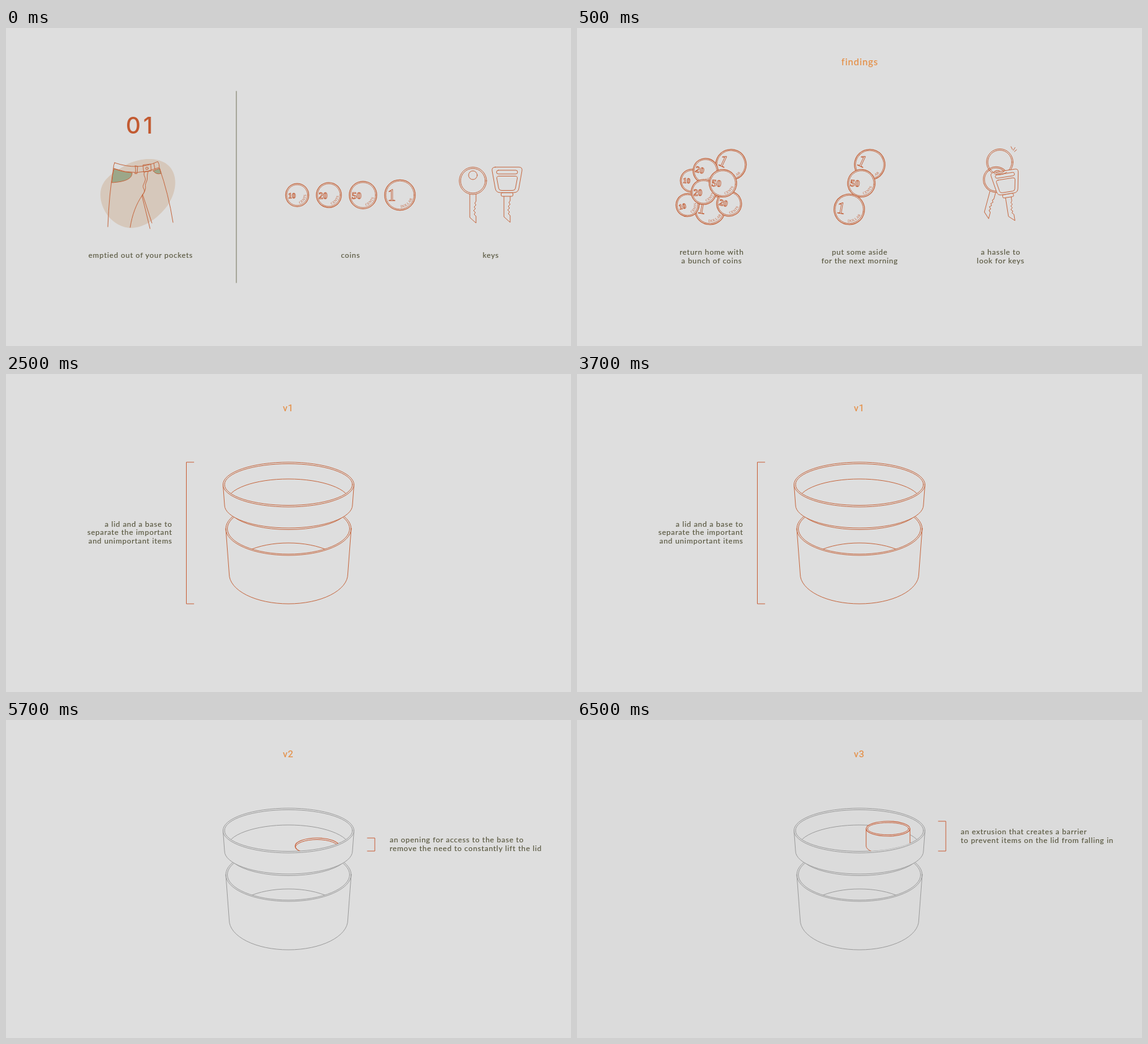
An HTML page for the animation above (8000 ms loop, 910x512 px).

```html
<!DOCTYPE html>
<html lang="en">
<head>
<meta charset="utf-8">
<style>
html, body { margin: 0; height: 100%; overflow: hidden; background: #dedede; }
svg { display: block; width: 100vw; height: 100vh; --bg: #dedede; --ink: #c4623b; --line: #c5673f; }
svg > g { display: none; }
svg > g.on { display: inline; }
path, circle, ellipse, rect { fill: none; stroke: var(--line); stroke-linecap: round; stroke-linejoin: round; }
.solid { fill: var(--bg); }
.hot { --line: #c85f38; }
.muted { --line: #9b9b9b; }
text { font: 12px Lato, sans-serif; letter-spacing: .75px; fill: #58573f; stroke: #58573f; stroke-width: .15; white-space: pre; }
.title { font: 15px Lato, sans-serif; letter-spacing: .95px; fill: #e58d42; stroke: #e58d42; }
.version { font: 15px Roboto, sans-serif; letter-spacing: .8px; }
.number { font: 500 37px Inter, sans-serif; letter-spacing: 4px; fill: #c25a31; stroke: none; }
.value { font: bold 15px "Liberation Serif", serif; letter-spacing: 0; fill: none; stroke: var(--ink); stroke-width: .9; }
.unit { font: 5.8px "Liberation Serif", serif; letter-spacing: .3px; fill: var(--ink); stroke: none; }
</style>
</head>
<body>
<svg id="stage" viewBox="0 0 910 512" preserveAspectRatio="none"></svg>
<script>
const path = (d, attrs = '') => `<path d="${d}" ${attrs}/>`;
const ellipse = (cx, cy, rx, ry, attrs = '') =>
  `<ellipse cx="${cx}" cy="${cy}" rx="${rx}" ry="${ry}" ${attrs}/>`;
const place = (x, y, angle, scale, body) =>
  `<g transform="translate(${x} ${y}) rotate(${angle}) scale(${scale})">${body}</g>`;

// Lines of text; the shift cancels the letter spacing after the last glyph.
const shift = { start: 0, middle: .4, end: .75 };
const label = (x, y, anchor, ...lines) => lines.map((line, i) =>
  `<text x="${x + shift[anchor]}" y="${y + i * 13.7}" text-anchor="${anchor}">${line}</text>`).join('');
const version = n => `<text class="title version" x="446" y="60">v${n}</text>`;

// Value: radius, font size, left edge, baseline
const coins = {
  10: [19, 12, -14.5, 4.5],
  20: [20.5, 14, -16.3, 5.5],
  50: [22.5, 15.5, -18, 6],
  1: [25, 27, -20, 9]
};
const arcs = Object.entries(coins).map(([value, [r]]) => {
  const a = r - 4.5;
  return path(`M0 ${a}A${a} ${a} 0 0 0 ${a} 0`, `id="arc${value}"`);
}).join('');

function coin(value, x, y, angle = 0) {
  const [r, size, left, base] = coins[value];
  const dollar = value === 1;
  const weight = dollar ? 'normal' : 'bold';
  return place(x, y, angle, 1,
    ellipse(0, 0, r - .4, r - .4, 'class="solid" stroke-width="1.3"') +
    ellipse(0, 0, r - 2.3, r - 2.3, 'stroke-width=".9"') +
    `<text class="value" x="${left}" y="${base}" style="font-size:${size}px;font-weight:${weight}">${value}</text>` +
    `<text class="unit"><textPath href="#arc${value}" startOffset="${dollar ? 4 : 16}%">${dollar ? 'DOLLAR' : 'CENTS'}</textPath></text>`);
}

// Keys are centred on their heads.
const blade = (x, top) => path(
  `M${x} ${top}V59L${x + 10} 68V57l-3-3 2-3-3-3 3-3-2-3 3-3-2-3 2-3V${top}`, 'class="solid"');
const roundKey = blade(-5, 21) + ellipse(0, 0, 22, 22, 'class="solid"') +
  ellipse(0, 0, 19.8, 19.8) + ellipse(0, -9, 7, 7);
const squareKey = blade(-5, 26) +
  '<rect class="solid" x="-9.5" y="20" width="19" height="6" rx="2"/>' +
  path('M-19-21H19Q25-21 24-15L19 13Q18 20 11 20H-11Q-18 20-19 13L-24-15Q-25-21-19-21Z', 'class="solid"') +
  '<rect x="-17" y="-16" width="34" height="6" rx="3"/>' +
  path('M-13-6.5H13Q17-6.5 16.5-3L13.5 13Q13 16.5 9 16.5H-9Q-13 16.5-13.5 13L-16.5-3Q-17-6.5-13-6.5Z');

const trousers =
  path('M152 268C152 243 176 230 198 218C220 208 251 207 265 225C278 242 273 267 260 286C246 305 224 322 201 322C173 321 152 294 152 268Z',
    'style="fill:#d6c8bb;stroke:none"') +
  path('M174 226.5Q187 232 203 233Q204 247 170.5 249Q171 236 174 226.5ZM237 230L247.5 226L250 234Q242 237 237 230Z', 'style="fill:#9ca789"') +
  path(`M175 217Q173 221 173 226Q210 240 247 224.5Q247 219 244.5 215Q213 230 175 217Z
    M173 226Q166 267 164 320M247 225Q262 268 269 313
    M200 321C203 301 210 283 219 270L232 323M220 268L235 314
    M208 222l4 .5-1 12-3.5 0c2-4 1-8 .5-12.5M221 220.5l12-1.5 1 11-12 2ZM238 218l2 10
    M223 232c-3 6 3 8 1 14s-5 8-2 13-2 8-3 11M229 231c-3 8 0 11-3 17s0 8-2 13-2 5-5 9`) +
  ellipse(227, 226, 2, 2);

const ring = ellipse(681, 216, 21.4, 21.4) + ellipse(681, 216, 19.3, 19.3);
const keyring = place(675, 244, 15, .94, roundKey) + ring +
  place(691, 249, -9, .92, squareKey) +
  path('M672 234.5Q681 239 692 232.500M675 233Q681 236 688 231') +
  path('M699 191l2.3 4.5M705.5 192.5l-2.8 4.5M708 196l-3.5 3');

const rim = [455, 178, 103, 33.5];
const jar = extra =>
  ellipse(455, 249, 101, 43) + ellipse(455, 249, 98.5, 41) +
  ellipse(455, 315, 92, 43, 'clip-path="url(#baseRim)"') +
  path('M354 249L359.5 322A95.5 48 0 0 0 550.5 322L556 249') +
  path('M367 230A96 34.2 0 0 0 543 230', 'class="solid"') +
  path('M349.5 178L352 211A103 37 0 0 0 558 211L560.5 178', 'class="solid"') +
  ellipse(455, 178, 105.5, 36, 'class="solid"') + ellipse(...rim) +
  `<g clip-path="url(#lidRim)">${ellipse(455, 205, 99, 36)}${extra}</g>`;

const opening = `<g class="hot">${ellipse(501, 203, 35.3, 13, 'stroke-width="1.2"')}
  <g clip-path="url(#hole)">${ellipse(501, 205.5, 35, 13)}</g></g>`;
const tube = `<g class="hot">${path('M465.7 175V203A35.3 13 0 0 0 536.3 203V175', 'class="solid"')}
  ${ellipse(501, 175, 35.3, 12, 'class="solid" stroke-width="1.2"')}${ellipse(501, 175, 33, 9.8)}</g>`;
const bracket = (x, y1, x2, y2) => path(`M${x} ${y1}H${x2}V${y2}H${x}`, 'class="hot"');

const scenes = [
  [500, path('M371 102V410', 'style="stroke:#8b8b79;stroke-width:1.3"') +
    '<text class="number" x="193" y="170">01</text>' + trousers +
    coin(10, 469, 269) + coin(20, 520, 269) + coin(50, 575, 269) + coin(1, 634.5, 269) +
    place(752, 246, 0, 1, roundKey) + place(807, 245, 0, 1, squareKey) +
    label(216.5, 369.5, 'middle', 'emptied out of your pockets') +
    label(554.5, 369.5, 'middle', 'coins') + label(780.5, 369.5, 'middle', 'keys')],
  [2000, '<text class="title" x="455.5" y="60" text-anchor="middle">findings</text>' +
    coin(1, 248, 220, 25) + coin(10, 185, 246, 5) + coin(20, 207, 230, 14) +
    coin(1, 214, 292, 10) + coin(20, 245, 283, 13) + coin(10, 178, 285, -12) +
    coin(20, 204, 264) + coin(50, 235, 250, 5) +
    coin(1, 471.5, 220, 25) + coin(50, 458, 250, 5) + coin(1, 438.5, 292, 10) + keyring +
    label(216.5, 365, 'middle', 'return home with', 'a bunch of coins') +
    label(455, 365, 'middle', 'put some aside', 'for the next morning') +
    label(682, 365, 'middle', 'a hassle to', 'look for keys')],
  [2000, version(1) + jar('') + bracket(302.5, 142, 290.5, 370) +
    label(267, 245.7, 'end', 'a lid and a base to', 'separate the important', 'and unimportant items')],
  [2000, version(2) + `<g class="muted">${jar(opening)}</g>` + bracket(582, 190, 594, 211) +
    label(618, 197, 'start', 'an opening for access to the base to', 'remove the need to constantly lift the lid')],
  [1500, version(3) + `<g class="muted">${jar(tube)}</g>` + bracket(582, 163, 594, 211) +
    label(618, 184, 'start', 'an extrusion that creates a barrier', 'to prevent items on the lid from falling in')]
];

const stage = document.getElementById('stage');
const clip = (id, shape) => `<clipPath id="${id}">${shape}</clipPath>`;
stage.innerHTML = `<defs>${arcs}${clip('lidRim', ellipse(...rim))}
  ${clip('baseRim', ellipse(455, 249, 98.5, 41))}${clip('hole', ellipse(501, 203, 35.3, 13))}</defs>` +
  scenes.map(([, body]) => `<g>${body}</g>`).join('');
const groups = stage.querySelectorAll(':scope > g');
const loop = scenes.reduce((sum, [ms]) => sum + ms, 0);
const start = performance.now();

function draw() {
  let t = (performance.now() - start) % loop, current = 0;
  while (t >= scenes[current][0]) t -= scenes[current++][0];
  groups.forEach((g, i) => g.classList.toggle('on', i === current));
  const bg = current === 4 ? '#dbdbdb' : '#dedede';
  document.body.style.background = bg;
  stage.style.setProperty('--bg', bg);
  requestAnimationFrame(draw);
}
draw();
</script>
</body>
</html>
```
